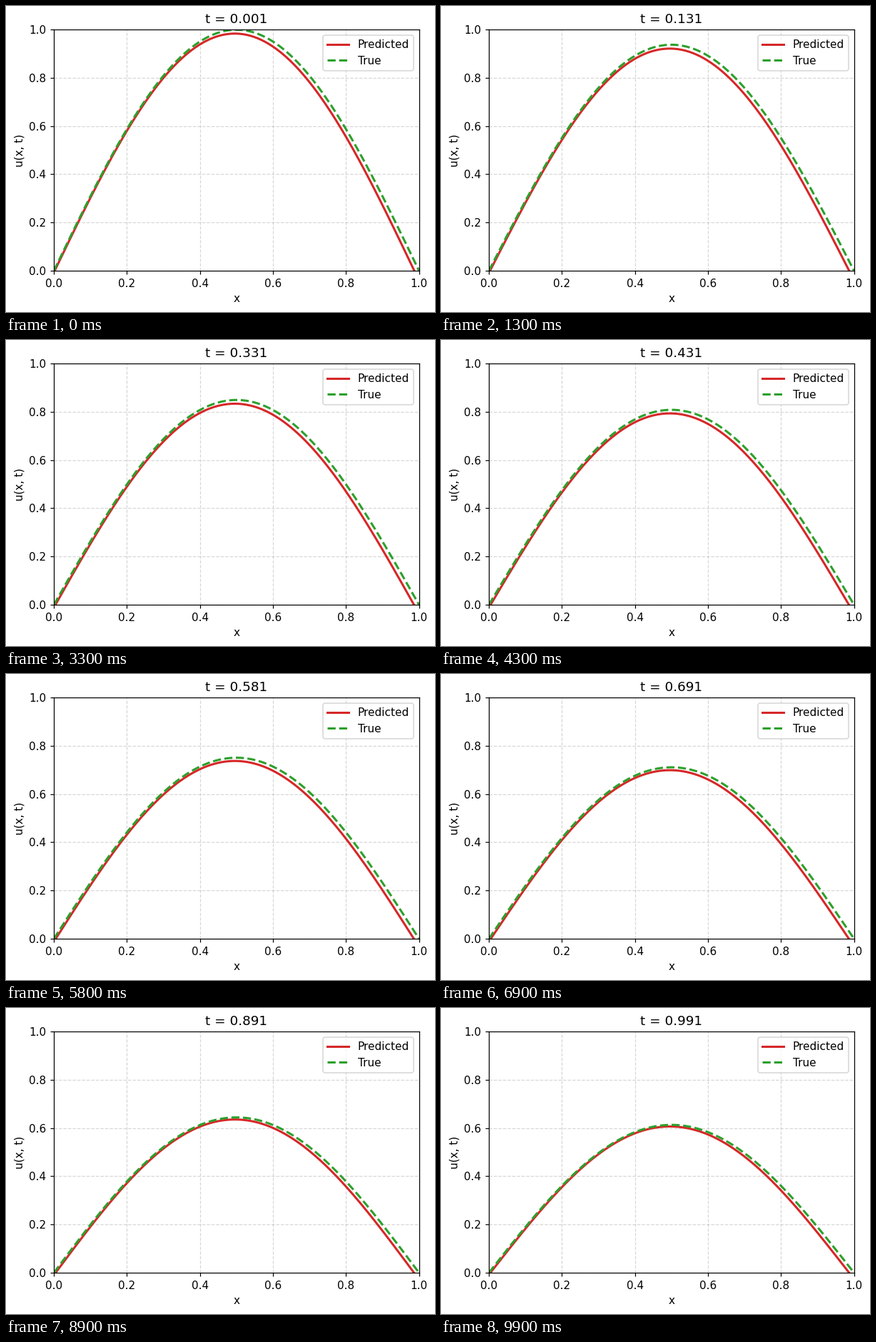
These frames come from a looping animation (601 px wide and 430 px high, 10 s). A matplotlib script:

```python
import numpy as np
import matplotlib.pyplot as plt
from matplotlib.animation import FuncAnimation

W, H, DPI = 601, 430, 110
FRAMES, INTERVAL = 100, 100
ALPHA = 0.05

plt.rcParams["font.family"] = "DejaVu Sans"

x = np.linspace(0, 1, 200)

# Model error sampled at a few positions (columns) and times (rows)
err_x = [0, 0.2, 0.5, 0.8, 1]
err_t = [0, 0.431, 0.991]
err = [
    [0.007, 0.0070, 0.0160, 0.0320, 0.041],
    [0.012, 0.0095, 0.0149, 0.0285, 0.036],
    [0.008, 0.0055, 0.0067, 0.0190, 0.026],
]
in_x = [np.polyval(np.polyfit(err_x, row, 4), x) for row in err]
err_coef = np.polyfit(err_t, in_x, 2)


def true_u(t):
    return np.exp(-ALPHA * np.pi**2 * t) * np.sin(np.pi * x)


def predicted_u(t):
    a, b, c = err_coef
    return true_u(t) - (a * t**2 + b * t + c)


# The tiny margin keeps the pixel size from truncating downwards
fig = plt.figure(figsize=((W + 1e-6) / DPI, (H + 1e-6) / DPI), dpi=DPI)
ax = fig.add_axes([67.1 / W, 58 / H, 511.5 / W, 338.8 / H])
ax.set(xlim=(0, 1), ylim=(0, 1), xlabel="x", ylabel="u(x, t)")
ax.grid(True, linestyle="--", alpha=0.5)

pred_line, = ax.plot(x, predicted_u(0), color="tab:red", lw=2, label="Predicted")
true_line, = ax.plot(x, true_u(0), "--", color="tab:green", lw=2, label="True")
title = ax.set_title("")
ax.legend(loc="upper right")


def update(i):
    t = 0.001 + 0.01 * i
    pred_line.set_ydata(predicted_u(t))
    true_line.set_ydata(true_u(t))
    title.set_text(f"t = {t:.3f}")
    return pred_line, true_line, title


anim = FuncAnimation(fig, update, frames=FRAMES, interval=INTERVAL,
                     repeat=True, repeat_delay=0)
plt.show()
```
